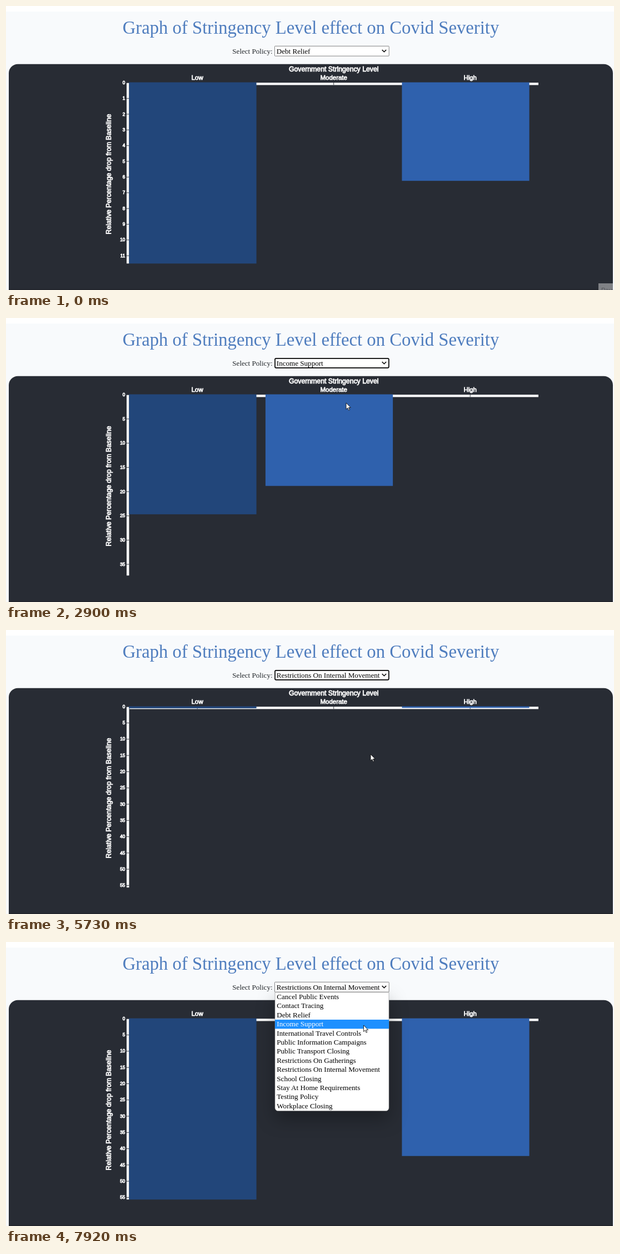
Write an HTML page that moves like this. It is 1094 by 512 pixels and loops after 8000 ms.

```html
<!DOCTYPE html>
<html lang="en">
<head>
<meta charset="utf-8">
<title>Stringency chart</title>
<style>
html, body { margin: 0; width: 100%; height: 100%; overflow: hidden; background: #fff; }
svg { display: block; width: 1094px; height: 512px; }
text { font: 13.09px "Liberation Serif", "Times New Roman", serif; }
.title { font-size: 32.7px; fill: #4f7dbe; text-anchor: middle; }
.chart text { font: 12.27px "Liberation Sans", Arial, sans-serif; fill: #fff; stroke: #fff; stroke-width: .8px; text-anchor: middle; }
.chart .cat { font-size: 11.45px; }
.chart .num { font-size: 8.18px; text-anchor: end; }
.tick { stroke: #282c34; stroke-width: .9; }
.panel { fill: #fff; stroke: #8a8a8a; stroke-width: .6; filter: drop-shadow(0 14px 16px rgba(0,0,0,.3)); }
.tip text { font: 11px "Liberation Sans", Arial, sans-serif; fill: #505257; }
</style>
</head>
<body>
<svg id="stage" viewBox="0 0 1094 512">
  <rect y="10" width="1094" height="502" fill="#f8fafc"/>
  <text class="title" x="548.5" y="50">Graph of Stringency Level effect on Covid Severity</text>
  <text x="407.3" y="86" fill="#212529">Select Policy:</text>
  <rect id="box" fill="#fff"/>
  <text id="choice" x="486.8" y="86"></text>
  <path d="M676.7 79l3.7 3.7 3.7-3.7" fill="none" stroke="#000" stroke-width="1.6"/>
  <rect x="5" y="104.8" width="1087" height="440" rx="16.4" fill="#282c34"/>
  <rect x="5" y="510" width="1087" height="2" fill="#23262d"/>
  <g class="chart">
    <text x="589.7" y="117.6">Government Stringency Level</text>
    <text transform="translate(189 303) rotate(-90)">Relative Percentage drop from Baseline</text>
    <path d="M222.3 138.2H958v4.2H222.3zM217 138.2h4.5V464.3h-4.5z" fill="#fff"/>
    <g id="cats"></g>
    <g id="ticks"></g>
    <g id="bars"></g>
  </g>
  <g class="tip" id="tip">
    <rect x="1066" y="500" width="26" height="12" fill="#808286"/>
    <text x="1071" y="516">Paus</text>
    <rect x="1092" y="500" width="2" height="12" fill="#f8fafc"/>
  </g>
  <g id="list">
    <path class="panel" d="M484 90.8h205V299a5.5 5.5 0 0 1-5.5 5.5h-194a5.5 5.5 0 0 1-5.5-5.5z"/>
    <rect id="hover" x="484" width="205" height="16.4" fill="#1e90ff"/>
    <g id="items"></g>
  </g>
  <circle id="halo" r="11" fill="#fff000" fill-opacity=".66"/>
  <path id="cursor" d="M0 0v11.6l2.7-2.5 1.9 4.3 1.8-.8-1.9-4.1h3.7z" fill="#fff" stroke="#000" stroke-width=".8"/>
</svg>
<script>
const LOOP = 8000, TOP = 138, DEPTH = 326.3, LIST_TOP = 90.8, ROW = 16.4;
const $ = id => document.getElementById(id);

const policies = ["Cancel Public Events", "Contact Tracing", "Debt Relief", "Income Support",
  "International Travel Controls", "Public Information Campaigns", "Public Transport Closing",
  "Restrictions On Gatherings", "Restrictions On Internal Movement", "School Closing",
  "Stay At Home Requirements", "Testing Policy", "Workplace Closing"];
const levels = ["Low", "Moderate", "High"];

// values per level; `grow` is when the bars begin to extend
const views = [
  { from: 0, grow: -2000, policy: 2, step: 1, max: 11.51, values: [11.51, 0, 6.25] },
  { from: 2275, grow: 2340, policy: 3, step: 5, max: 37.35, values: [37.35, 28.5, 0] },
  { from: 5525, grow: 5597, policy: 8, step: 5, max: 55.7, values: [55.7, 0, 42.3] }
];
const openTimes = [[1140, 2275], [4295, 5525], [7175, LOOP]];
const clicks = [[1070, 1268], [2208, 2275], [4228, 4358], [5458, 5525], [7108, 7308]];

// pointer path: time, x, y
const path = [[65, 1080, 490], [260, 630, 92], [570, 630, 92], [1040, 612, 80], [1450, 612, 80],
  [2010, 612, 153], [3250, 612, 153], [3830, 681, 83], [4030, 674, 79], [4480, 674, 79],
  [5190, 656, 222], [5260, 656, 224], [6290, 656, 224], [7040, 676, 80], [7490, 676, 80],
  [7920, 643.5, 150]];

const inside = (t, spans) => spans.some(([a, b]) => t >= a && t < b);
const show = (id, on) => $(id).setAttribute("visibility", on ? "visible" : "hidden");
const set = (el, attrs) => { for (const k in attrs) el.setAttribute(k, attrs[k]); };
const smooth = p => p * p * (3 - 2 * p);
const cubicInOut = p => p < .5 ? 4 * p ** 3 : 1 - 4 * (1 - p) ** 3;
const clamp = p => Math.min(1, Math.max(0, p));

function pointer(t) {
  const i = path.findIndex(k => k[0] > t);
  if (i < 1) return path[i ? path.length - 1 : 0].slice(1);
  const [a, b] = [path[i - 1], path[i]];
  const p = smooth((t - a[0]) / (b[0] - a[0]));
  return [1, 2].map(j => a[j] + (b[j] - a[j]) * p);
}

$("cats").innerHTML = levels.map((name, i) => {
  const x = 344.2 + 245.5 * i;
  return `<text class="cat" x="${x}" y="133">${name}</text><path class="tick" d="M${x} 138v4.4"/>`;
}).join("");
$("bars").innerHTML = levels.map((_, i) =>
  `<rect x="${221.4 + 245.5 * i}" y="${TOP - .4}" width="229.2"/>`).join("");
$("items").innerHTML = policies.map((name, i) =>
  `<text x="487.3" y="${LIST_TOP + ROW * i + 12.1}">${name}</text>`).join("");

let current;
function load(view) {
  current = view;
  $("choice").textContent = policies[view.policy];
  let marks = "";
  for (let v = 0; v <= view.max; v += view.step) {
    const y = TOP + .3 + DEPTH * v / view.max;
    marks += `<text class="num" x="214.3" y="${y + 2.6}">${v}</text><path class="tick" d="M216.6 ${y}h4.9"/>`;
  }
  $("ticks").innerHTML = marks;
  [...$("bars").children].forEach((bar, i) =>
    bar.setAttribute("fill", i ? "#2f61ad" : "#22467a"));
}

function draw(t) {
  const view = views.findLast(v => t >= v.from);
  if (view !== current) load(view);

  const grown = cubicInOut(clamp((t - view.grow) / 1000));
  [...$("bars").children].forEach((bar, i) => {
    const h = DEPTH * view.values[i] / view.max * grown;
    bar.setAttribute("height", h > .3 ? h + .4 : 0);
  });

  const open = inside(t, openTimes), focused = view.from > 0 && !open;
  set($("box"), focused
    ? { x: 484, y: 72.8, width: 204.8, height: 17, rx: 2, stroke: "#000", "stroke-width": 1.7 }
    : { x: 483.4, y: 72.3, width: 205.8, height: 17.9, rx: 1, stroke: "#767676", "stroke-width": .9 });

  show("list", open);
  const lagY = pointer(t - 60)[1];
  const row = lagY > LIST_TOP ? Math.floor((lagY - LIST_TOP) / ROW) : view.policy;
  $("hover").setAttribute("y", LIST_TOP + ROW * row);
  [...$("items").children].forEach((item, i) =>
    item.setAttribute("fill", i === row ? "#fff" : "#000"));

  const [x, y] = pointer(t);
  show("tip", t < 65);
  show("cursor", t >= 65);
  show("halo", inside(t, clicks));
  $("cursor").setAttribute("transform", `translate(${x} ${y})`);
  set($("halo"), { cx: x, cy: y });
}

const start = performance.now();
function tick() {
  draw((performance.now() - start) % LOOP);
  requestAnimationFrame(tick);
}
tick();
</script>
</body>
</html>
```
